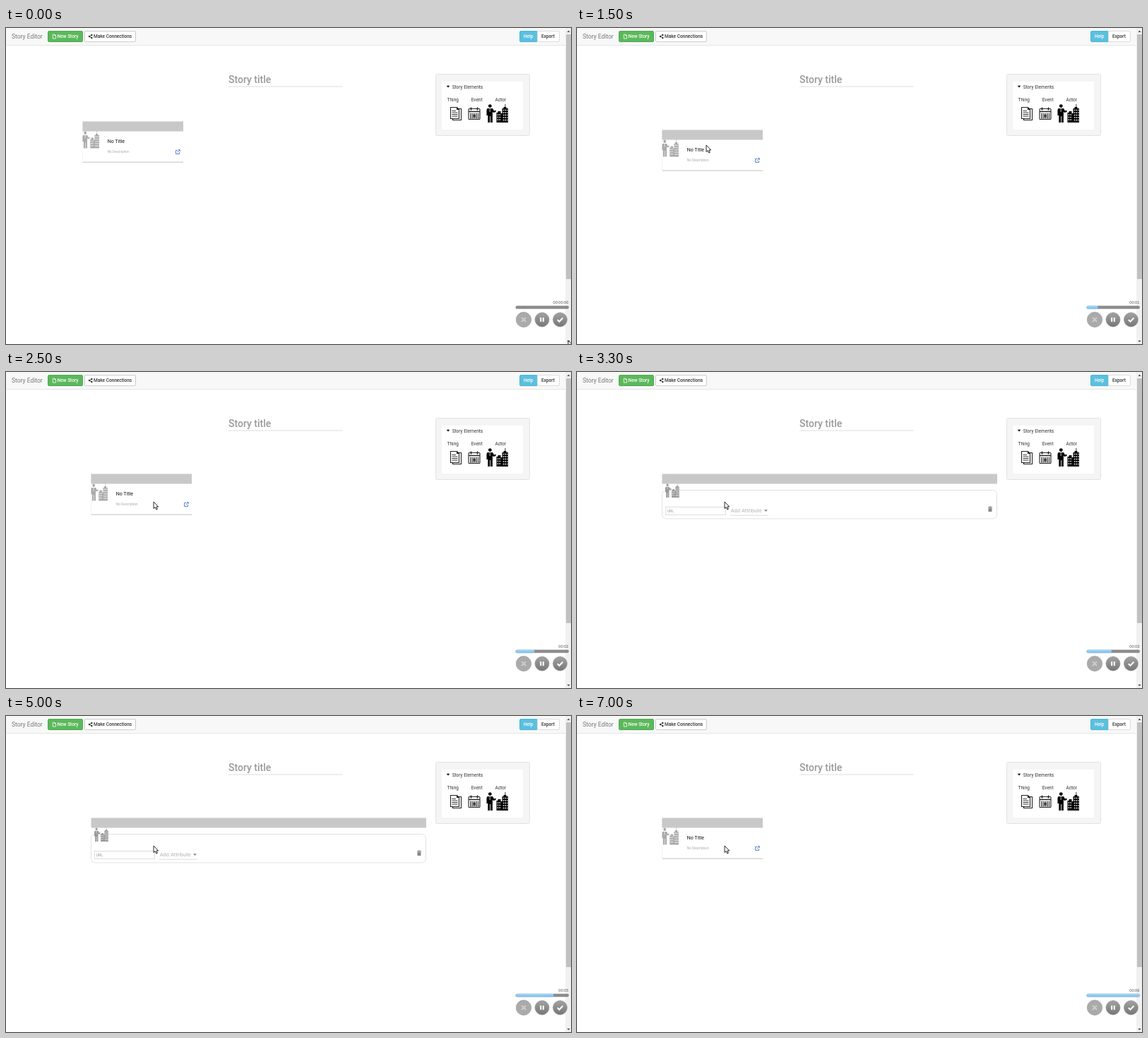
Write an HTML page that moves like this. It is 800 px wide and 448 px high and loops after 7.1 s.

```html
<!DOCTYPE html>
<html lang="en">
<head>
<meta charset="utf-8">
<title>Story Editor</title>
<style>
  html, body { margin: 0; width: 100%; height: 100%; overflow: hidden; background: #fff; }
  svg { display: block; }
  text { font: 6.5px Roboto, sans-serif; fill: #333; }
  .button { font-weight: 500; }
  .clock { font: 5.6px "Liberation Sans", sans-serif; fill: #555; text-anchor: end; }
</style>
</head>
<body>
<svg width="800" height="448" viewBox="0 0 800 448">
  <defs>
    <filter id="shadow" x="-5%" y="-10%" width="110%" height="125%">
      <feDropShadow dx="0" dy=".8" stdDeviation=".7" flood-opacity=".4"/>
    </filter>
    <linearGradient id="knob" x2="0" y2="1">
      <stop stop-color="#a2a2a2"/><stop offset="1" stop-color="#777"/>
    </linearGradient>
    <linearGradient id="fill" x2="0" y2="1">
      <stop stop-color="#a8dafa"/><stop offset="1" stop-color="#79b9ec"/>
    </linearGradient>
    <!-- Person beside two towers, 31 x 26 -->
    <g id="actor">
      <circle cx="4.8" cy="2.6" r="2.4"/>
      <path d="M1 6H8.6L10.5 9.5 13 8.5V11L9.6 12 8.4 10.5V26H5.4V17H4.6V26H1.8V16H0V8Z"/>
      <path d="M14 26V12H16V10H20V13H22V6H24V4H26V0H26.8V4H28V6H30.5V26Z"/>
      <path d="M4.7 6V11" stroke="#fff" stroke-width=".8"/>
      <g fill="none" stroke="#fff" stroke-width="1.5">
        <path d="M15.2 15H21M15.2 18.5H21M15.2 22H21" stroke-dasharray="1.5 1.3"/>
        <path d="M23.3 8.5H30M23.3 12H30M23.3 15.5H30M23.3 19H30M23.3 22.5H30" stroke-dasharray="1.5 1.2"/>
      </g>
    </g>
  </defs>

  <rect width="792" height="24" fill="#f8f8f8"/>
  <path d="M0 24.5H792" stroke="#e7e7e7"/>
  <text x="8" y="15.4" style="font-size:8.5px;fill:#777">Story Editor</text>
  <rect x="59.5" y="4.5" width="49" height="15" rx="1.5" fill="#5cb85c" stroke="#4cae4c"/>
  <path d="M66.3 9.2H69L70.6 10.8V15H66.3ZM69 9.2V11H70.6" fill="none" stroke="#fff" stroke-width=".8"/>
  <text class="button" x="72.6" y="14.3" style="fill:#fff">New Story</text>
  <rect x="111.5" y="4.5" width="72" height="15" rx="1.5" fill="#fff" stroke="#ccc"/>
  <path d="M121.3 10 118 12 121.3 14" fill="none" stroke="#333" stroke-width=".8"/>
  <g fill="#333"><circle cx="118" cy="12" r="1.2"/><circle cx="121.3" cy="10" r="1.2"/><circle cx="121.3" cy="14" r="1.2"/></g>
  <text class="button" x="124" y="14.3">Make Connections</text>
  <rect x="727.5" y="4.5" width="25" height="15" rx="1.5" fill="#5bc0de" stroke="#46b8da"/>
  <text class="button" x="733" y="14.3" style="fill:#fff">Help</text>
  <rect x="752.5" y="4.5" width="31" height="15" rx="1.5" fill="#fff" stroke="#ddd"/>
  <text class="button" x="758" y="14.3">Export</text>

  <rect x="792" width="8" height="448" fill="#f1f1f1"/>
  <rect x="793" y="9" width="7" height="347" fill="#c1c1c1"/>
  <path d="M794.3 6 796.5 3.6 798.7 6ZM794.3 443 796.5 445.4 798.7 443Z" fill="#555"/>

  <text x="315" y="77.5" style="font-size:14px;font-weight:500;fill:#999">Story title</text>
  <path d="M315 83H476.5" stroke="#ddd"/>

  <rect x="608.5" y="65.5" width="133" height="87" rx="2" fill="#f5f5f5" stroke="#e3e3e3"/>
  <rect x="617" y="76" width="115" height="68" fill="#fff"/>
  <path d="M623.8 81.8H628.2L626 84.5Z"/>
  <text x="631.7" y="85.8">Story Elements</text>
  <text x="624.6" y="103.5">Thing</text>
  <text x="658.7" y="103.5">Event</text>
  <text x="692.4" y="103.5">Actor</text>
  <g fill="#fff" stroke="#222" stroke-width="1.1">
    <path d="M632.5 114.5H644.5V130.5H632.5Z"/>
    <path d="M629.5 112.5H638.5L641.5 115.5V128.5H629.5ZM638.5 112.5V115.5H641.5"/>
    <path d="M631.5 117.5H637M631.5 120H639.5M631.5 122.5H639.5M631.5 125H639.5" stroke-width=".9"/>
    <rect x="655" y="114.5" width="16" height="15" rx="1"/>
    <path d="M655 118.5H671M658.5 112.5V116.5M667.5 112.5V116.5" stroke-width="1.6"/>
    <path d="M657 122H669.5M657 124.7H669.5M657 127.4H669.5" stroke-width="1.7" stroke-dasharray="1.9 .75"/>
    <path d="M661.5 124.7H664.5" stroke-width="3"/>
  </g>
  <use href="#actor" x="680.5" y="108"/>

  <g id="closed">
    <rect x="108.5" y="132.5" width="142.5" height="57" fill="#fff" filter="url(#shadow)"/>
    <rect x="108.5" y="132.5" width="142.5" height="14" fill="#c8c8c8"/>
    <use href="#actor" transform="translate(108.5 146.3) scale(.77 .93)" fill="#aaa"/>
    <text x="143.7" y="163" style="font-size:7px;fill:#111">No Title</text>
    <text x="143.7" y="176.8" style="font-size:4.7px;fill:#aaa">No Description</text>
    <path d="M243 173.5H240.5V178.5H245.5V176M242.5 176.5 246 173M243.9 172.7H246.3V175" fill="none" stroke="#4a78c4" stroke-width=".9"/>
  </g>

  <g id="opened">
    <rect x="120.5" y="144.5" width="474.5" height="14" fill="#c8c8c8"/>
    <rect x="120.5" y="167.5" width="474" height="40.5" rx="6" fill="#fff" stroke="#e2e2e2"/>
    <use href="#actor" transform="translate(125 158.3) scale(.65 .76)" fill="#999"/>
    <rect x="125.5" y="191.5" width="85" height="11" fill="#fff" stroke="#ddd"/>
    <text x="127.5" y="199" style="font-size:5.4px;fill:#999">URL</text>
    <text x="217.7" y="199" style="font-size:7.5px;fill:#b4b4b4">Add Attribute</text>
    <path d="M265 195.3H270L267.5 198Z" fill="#888"/>
    <path d="M217 203.3H271" stroke="#ddd"/>
    <path d="M582 191.3H583.7V190.6H586.3V191.3H588V192.4H582ZM582.5 193H587.5V198H582.5Z" fill="#888"/>
  </g>

  <text id="clock" class="clock" x="796.3" y="391"></text>
  <rect x="721.5" y="393.7" width="75.5" height="4.6" rx="2.3" fill="#8c8c8c"/>
  <rect id="progress" x="721.5" y="393.7" height="4.6" rx="2.3" fill="url(#fill)"/>
  <g fill="url(#knob)" stroke="#888" stroke-width=".6">
    <circle cx="733" cy="413.5" r="10.7" fill="#aaa" stroke="#999"/>
    <circle cx="759" cy="413.5" r="10"/>
    <circle cx="784.5" cy="413.5" r="10"/>
  </g>
  <g fill="none" stroke="#fff" stroke-width="2">
    <path d="M730 410.5 736 416.5M736 410.5 730 416.5" stroke="#ccc"/>
    <path d="M757.2 410.5V416.5M760.8 410.5V416.5"/>
    <path d="M780.8 413.6 783.4 416.2 788.4 411"/>
  </g>

  <path id="cursor" d="M0 0V9.6L2.2 7.6 3.8 11 5.4 10.3 3.9 7H6.7Z" fill="#fff" stroke="#111" stroke-width=".9"/>
</svg>
<script>
  const LOOP = 7100, STEP = 100;
  // Keys are [ms, x, y]
  const cursorPath = [
    [0, 796, 443], [100, 775, 434], [300, 550, 318], [400, 402, 238], [500, 320, 210],
    [700, 185, 169], [800, 185, 169], [1000, 176, 140], [1300, 188, 152],
    [1500, 183, 166], [1900, 209, 184]
  ];
  const cardPath = [[1000, 0, 0], [1300, 12, 12]];
  const openTimes = [[1900, 2400], [3000, 3800], [4500, 6100]];
  const [closed, opened, clock, progress, cursor] =
    ["closed", "opened", "clock", "progress", "cursor"].map(id => document.getElementById(id));

  function along(path, t) {
    const next = path.findIndex(key => key[0] > t);
    if (next === 0) return path[0].slice(1);
    if (next < 0) return path[path.length - 1].slice(1);
    const [t0, x0, y0] = path[next - 1], [t1, x1, y1] = path[next];
    const k = (t - t0) / (t1 - t0);
    return [x0 + (x1 - x0) * k, y0 + (y1 - y0) * k];
  }

  const place = (node, point) => node.setAttribute("transform", `translate(${point})`);
  const show = (node, on) => node.setAttribute("visibility", on ? "visible" : "hidden");

  function draw(now) {
    const t = Math.floor(now % LOOP / STEP) * STEP;
    const isOpen = openTimes.some(([from, to]) => t >= from && t < to);
    show(opened, isOpen);
    show(closed, !isOpen);
    place(closed, along(cardPath, t));
    place(cursor, along(cursorPath, t));
    clock.textContent = t ? "00:0" + Math.min(6, Math.floor(t / 1000)) : "00:00:00";
    progress.setAttribute("width", 75.5 * t / (LOOP - STEP));
    requestAnimationFrame(draw);
  }
  requestAnimationFrame(draw);
</script>
</body>
</html>
```
